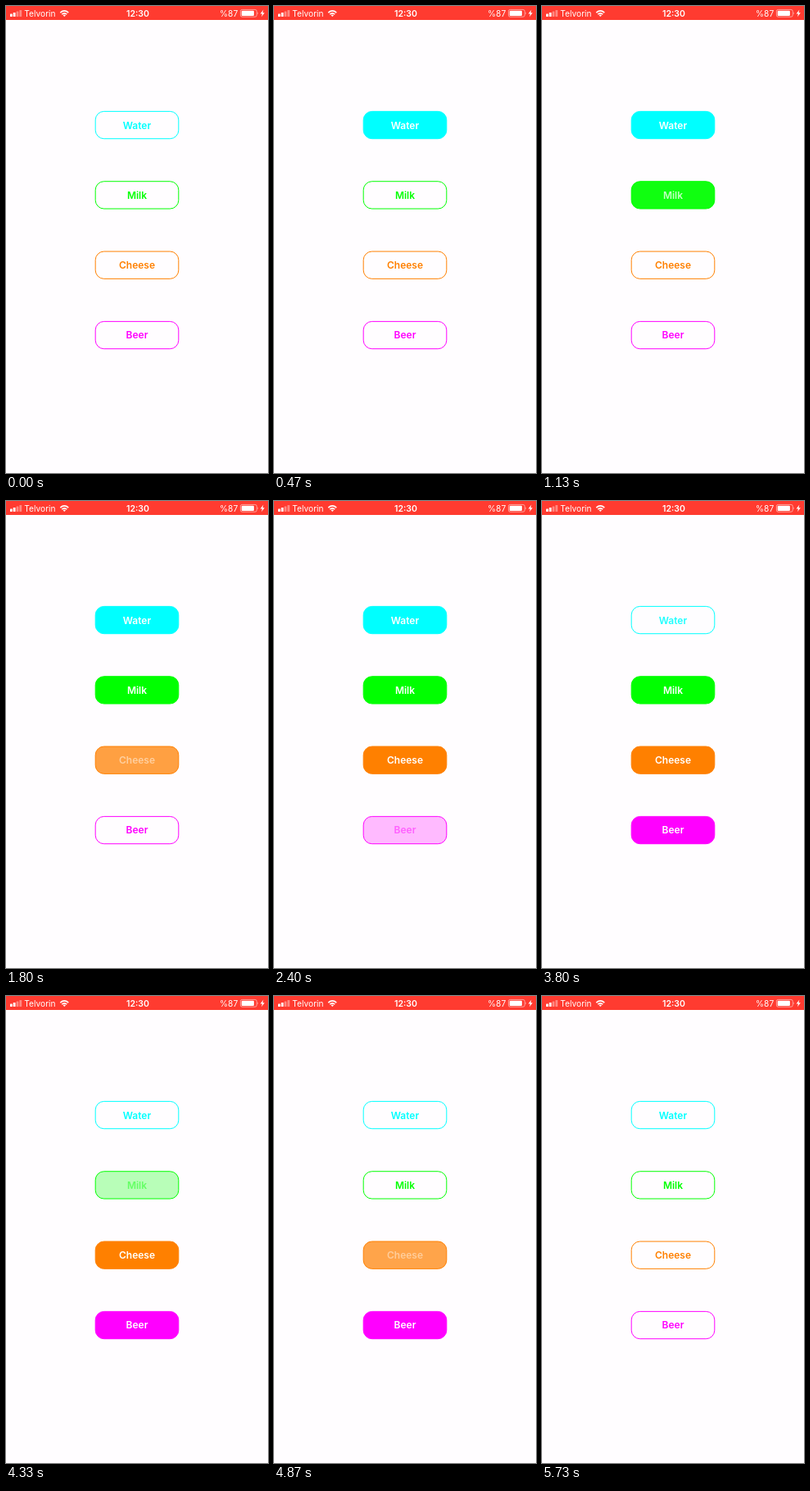
Write an HTML page that moves like this. It is 320 by 569 pixels and loops after 5.79 s.

```html
<!DOCTYPE html>
<html lang="en">
<head>
<meta charset="utf-8">
<title>Toggle buttons</title>
<style>
  html, body { margin: 0; width: 100%; height: 100%; overflow: hidden; background: #fffdff; }
  svg { display: block; width: 100vw; height: 100vh; }
  text { font-family: Inter, Roboto, sans-serif; }
  .bar text { font-size: 10.2px; fill: #fff; }
  .button text { font-size: 12px; font-weight: 600; text-anchor: middle; }
</style>
</head>
<body>
<svg id="stage" viewBox="0 0 320 569">
  <rect width="320" height="569" fill="#fffdff"/>
  <g class="bar" fill="#fff">
    <rect width="320" height="17" fill="#ff3b30"/>
    <rect x="5" y="9.5" width="2.8" height="3.5" rx=".6"/>
    <rect x="8.8" y="8" width="2.8" height="5" rx=".6"/>
    <rect x="12.6" y="6.5" width="2.8" height="6.5" rx=".6" opacity=".4"/>
    <rect x="16.4" y="5" width="2.8" height="8" rx=".6" opacity=".4"/>
    <text x="22.3" y="12.6">Telvorin</text>
    <g fill="none" stroke="#fff" stroke-width="1.6">
      <path d="M66.3 8.1Q71.3 3.7 76.3 8.1"/>
      <path d="M68.3 10.1Q71.3 7.5 74.3 10.1"/>
    </g>
    <path d="M69.6 11.2Q71.3 9.9 73 11.2L71.3 13Z"/>
    <text x="161" y="12.6" text-anchor="middle" style="font-weight:600;font-size:10.5px">12:30</text>
    <text x="283.2" y="12.6" text-anchor="end">%87</text>
    <rect x="286.4" y="4.4" width="19.8" height="8.8" rx="2" fill="none" stroke="#fff" stroke-width=".8" opacity=".65"/>
    <rect x="287.7" y="5.7" width="15.2" height="6.2" rx="1"/>
    <path d="M307 7.2q1.4 1.6 0 3.2z" opacity=".7"/>
    <path d="M314.4 4.4L310.6 9.4H313L312 13.2L315.8 8.2H313.4Z"/>
  </g>
</svg>
<script>
const LOOP = 5790;
const stage = document.getElementById('stage');

// on and off hold the start and end of each fade, in ms
const buttons = [
  { label: 'Water',  rgb: [0, 255, 255], on: [0, 470],     off: [3400, 3870] },
  { label: 'Milk',   rgb: [0, 255, 0],   on: [800, 1270],  off: [4070, 4530] },
  { label: 'Cheese', rgb: [255, 128, 0], on: [1530, 2000], off: [4670, 5130] },
  { label: 'Beer',   rgb: [255, 0, 255], on: [2200, 2670], off: [5270, 5730] }
];

function add(parent, tag, attrs) {
  const el = document.createElementNS('http://www.w3.org/2000/svg', tag);
  for (const key in attrs) el.setAttribute(key, attrs[key]);
  return parent.appendChild(el);
}

buttons.forEach((b, i) => {
  const y = 128 + i * 85.33;
  const color = `rgb(${b.rgb})`;
  const group = add(stage, 'g', { class: 'button' });
  b.box = add(group, 'rect', {
    x: 109.2, y: y + .4, width: 101.6, height: 33.3, rx: 10.5, fill: color, stroke: color
  });
  b.text = add(group, 'text', { x: 160, y: y + 21.5 });
  b.text.textContent = b.label;
});

const phase = (t, [start, end]) => Math.min(1, Math.max(0, (t - start) / (end - start)));
const ease = u => u < .5 ? 8 * u ** 4 : 1 - 8 * (1 - u) ** 4;

function draw() {
  const t = performance.now() % LOOP;
  for (const b of buttons) {
    const on = phase(t, b.on), off = phase(t, b.off);
    const level = ease(on) - ease(off);
    const press = Math.sin(Math.PI * on) + Math.sin(Math.PI * off);
    b.box.setAttribute('fill-opacity', level);
    b.text.setAttribute('fill', `rgb(${b.rgb.map(c => Math.round(c + (255 - c) * level))})`);
    b.text.setAttribute('fill-opacity', 1 - .25 * press);
  }
  requestAnimationFrame(draw);
}
draw();
</script>
</body>
</html>
```
